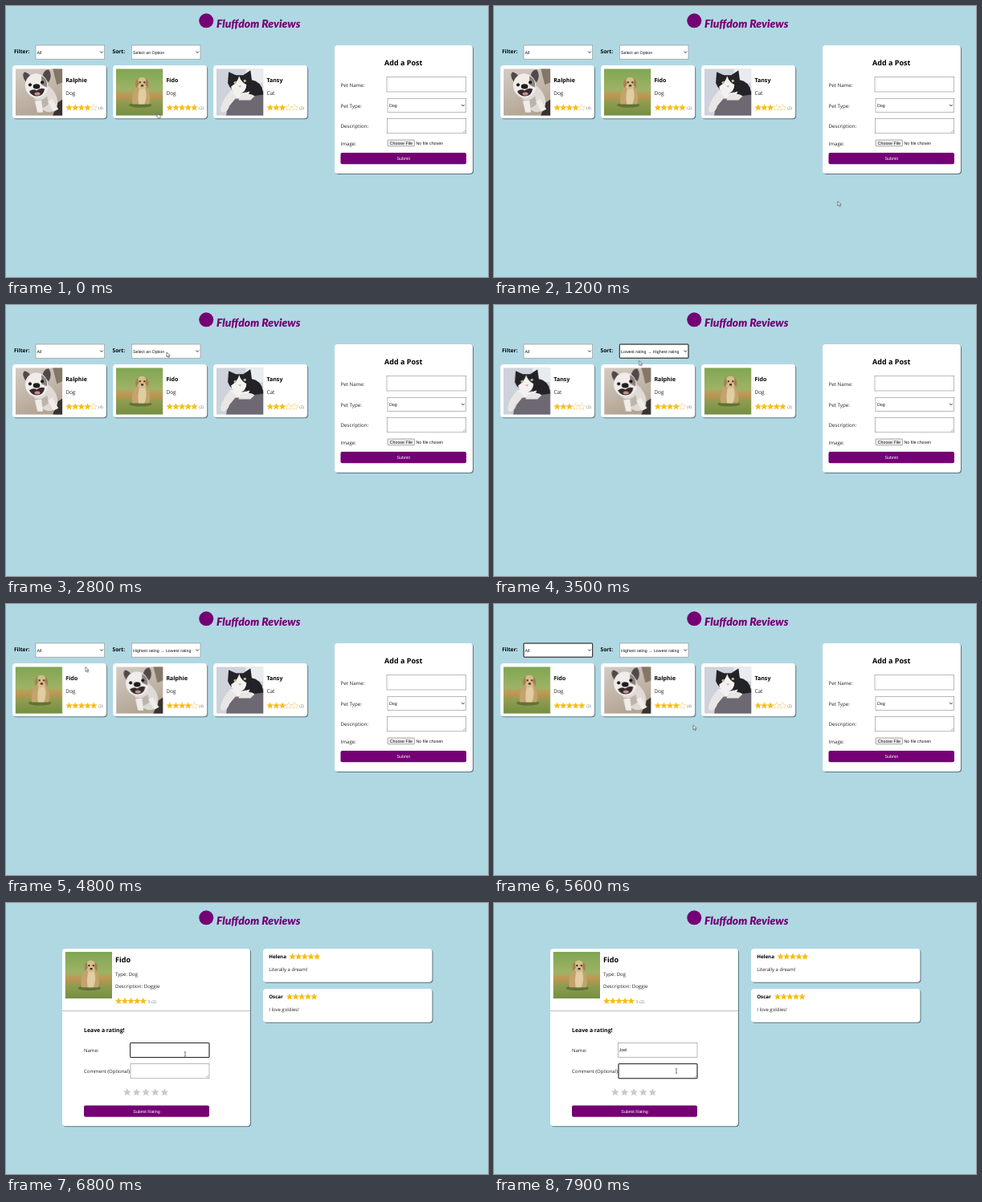
Animation of 600x338 px, one loop 8000 ms. Source, as an HTML page:

```html
<!DOCTYPE html>
<html lang="en">
<head>
<meta charset="utf-8">
<title>Pet ratings</title>
<style>
html, body { margin: 0; width: 100%; height: 100%; overflow: hidden; background: #b0d8e3; }
svg { display: block; }
#stage { width: 600px; height: 338px; text-rendering: geometricPrecision; }
text { font-family: "Open Sans", "Noto Sans", sans-serif; fill: #222; white-space: pre; }
.b { font-weight: 700; fill: #000; }
.ui { font-family: "Liberation Sans", Arial, sans-serif; fill: #111; }
.dim { fill: #777; }
.on { font-family: "Liberation Sans", Arial, sans-serif; fill: #fff; text-anchor: middle; }
.mid { text-anchor: middle; }
.brand { font: italic 900 13.9px Lato, sans-serif; fill: #740074; }
.card { fill: #fff; filter: drop-shadow(1px 1px .7px rgba(30, 50, 60, .6)); }
.field { fill: #fff; stroke: #8a8a8a; stroke-width: .6; }
.focus { fill: none; stroke: #111; stroke-width: .9; }
.line { fill: none; stroke: #222; stroke-width: .9; }
.btn { fill: #740074; }

.ralphie, .fido, .tansy { animation: 8s step-end infinite; }
.ralphie { animation-name: ralphie; }
.fido { animation-name: fido; }
.tansy { animation-name: tansy; }
@keyframes ralphie {
  0% { transform: translateX(0); }
  42.5%, 100% { transform: translateX(125.2px); }
}
@keyframes fido {
  0% { transform: translateX(125.2px); }
  42.5% { transform: translateX(250.2px); }
  53.75%, 100% { transform: translateX(0); }
}
@keyframes tansy {
  0% { transform: translateX(250.2px); opacity: 1; }
  42.5% { transform: translateX(0); opacity: 1; }
  53.75% { transform: translateX(250.2px); opacity: 1; }
  61.875% { transform: translateX(250.2px); opacity: 0; }
  67.5%, 100% { transform: translateX(250.2px); opacity: 1; }
}

.pointer { animation: pointer 8s linear infinite; }
@keyframes pointer {
  0%, 1.25% { transform: translate(188.5px, 133px); }
  6% { transform: translate(205px, 205px); }
  11.25% { transform: translate(300px, 260px); }
  16.25% { transform: translate(470px, 238px); }
  21.25% { transform: translate(562px, 175px); }
  23.75% { transform: translate(560px, 192px); }
  28.75% { transform: translate(354px, 171px); }
  33.75%, 36.25% { transform: translate(200px, 59px); }
  41.25%, 42.5% { transform: translate(182px, 85px); }
  43.75% { transform: translate(180.5px, 69.5px); }
  47.5%, 49% { transform: translate(190px, 58px); }
  53%, 54% { transform: translate(188px, 78px); }
  60% { transform: translate(99px, 78.5px); }
  61.875% { transform: translate(92px, 78px); }
  64.5%, 65.5% { transform: translate(88px, 58px); }
  67.5% { transform: translate(90px, 70px); }
  70% { transform: translate(248px, 151px); }
  72% { transform: translate(240px, 152px); }
  77%, 78.75% { transform: translate(92px, 111px); }
  80%, 82.5% { transform: translate(205px, 184px); }
  84%, 92.5% { transform: translate(223px, 188.5px); }
  95%, 100% { transform: translate(227px, 209.5px); }
}
</style>
</head>
<body>
<svg id="stage" viewBox="0 0 600 338">
  <defs>
    <path id="star" d="M0-4.2 1.25-1.4 4.2-1.2 1.95.75 2.6 3.7 0 2.1-2.6 3.7-1.95.75-4.2-1.2-1.25-1.4Z"/>
    <linearGradient id="floor" x2=".4" y2="1">
      <stop stop-color="#d3ccc5"/><stop offset="1" stop-color="#b3a594"/>
    </linearGradient>
    <linearGradient id="grass" x2="0" y2="1">
      <stop stop-color="#7fa652"/><stop offset=".45" stop-color="#9fb266"/>
      <stop offset=".58" stop-color="#c39350"/><stop offset=".7" stop-color="#929c50"/>
      <stop offset="1" stop-color="#748f42"/>
    </linearGradient>
    <symbol id="ralphie" viewBox="0 0 58 58">
      <path fill="url(#floor)" d="M0 0h58v58H0z"/>
      <path fill="#857768" d="M46 0h12v17l-7 3z"/>
      <path fill="#39322f" d="M52 42l6-4v20H46z"/>
      <ellipse cx="37" cy="36" rx="13" ry="19" fill="#dfdad6" transform="rotate(-32 37 36)"/>
      <path fill="#bdb4ad" d="M22 37q8 5 17-3l2 10q-8 7-16 4z"/>
      <path fill="#f0ece8" d="M24 40l3 14h7l-2-15zM40 41l7 12 6-3-8-13z"/>
      <path fill="#514849" d="M13 17Q7 8 11 4q6 1 9 8zM33 10q2-9 8-9 5 7 0 16z"/>
      <ellipse cx="26" cy="21" rx="14" ry="15" fill="#f0ece9" transform="rotate(-10 26 21)"/>
      <path fill="#8b8280" d="M32 9q8 3 7 14l-7-3z"/>
      <circle cx="18" cy="20" r="2" fill="#191718"/>
      <circle cx="33" cy="17" r="2" fill="#191718"/>
      <ellipse cx="26" cy="22" rx="4.3" ry="3" fill="#201d20"/>
      <path fill="#352a2c" d="M17 28q5-4 9-1 5-4 10-2-1 8-9 9-7 0-10-6z"/>
      <ellipse cx="27" cy="31" rx="3.5" ry="2" fill="#c38d91"/>
    </symbol>
    <symbol id="fido" viewBox="0 0 58 58">
      <path fill="url(#grass)" d="M0 0h58v58H0z"/>
      <ellipse cx="30" cy="45" rx="14" ry="3" fill="#5f7334"/>
      <path fill="#c3a36d" d="M26 21q-8 9-6 23h21q3-9-3-22z"/>
      <path fill="#e0cda2" d="M29 24q-3 10-1 20h7q4-10 1-20z"/>
      <ellipse cx="32" cy="18" rx="6.5" ry="7.5" fill="#d6bd8b"/>
      <path fill="#a58250" d="M27 12q-5 5-2 12l3-4zM37 12q5 5 2 12l-3-4z"/>
      <path fill="#3a2d22" d="M28.5 16h2v2h-2zM34 16h2v2h-2zM30.8 20h3v2.2h-3z"/>
    </symbol>
    <symbol id="tansy" viewBox="0 0 58 58">
      <path fill="#cdd2db" d="M0 0h58v58H0z"/>
      <path fill="#e9ebef" d="M36 0h22v18H36z"/>
      <path fill="#6d6872" d="M15 36q17-10 43-9v31H12z"/>
      <path fill="#232226" d="M36 13q15 0 20 10l2 9-22 3z"/>
      <path fill="#232226" d="M14 18l1-14 9 4h9l9-6 2 15q-1 11-14 13-12-1-16-12z"/>
      <path fill="#f3f2f0" d="M28 9q2 7 9 11 0 9-9 11-9 0-10-9 8-5 10-13zM17 27q11 6 24 1l-3 9H15z"/>
      <path fill="#e9e7e5" d="M17 28Q8 37 5 49q0 6 4 5 5-1 7-8l9-11zM30 33q12-4 17 1l-5 5H27z"/>
      <circle cx="23" cy="17" r="1.6" fill="#b8c391"/>
      <circle cx="35" cy="15" r="1.6" fill="#b8c391"/>
      <path fill="#cf9897" d="M27 21h4l-2 2z"/>
    </symbol>
  </defs>
</svg>
<script>
const LOOP = 8000, OPEN = 6250;
const stage = document.getElementById('stage');
const rules = [];

// Shows a piece of markup only from one time to another
const during = (from, to, body) => {
  const name = 'w' + rules.length, pc = t => t / LOOP * 100 + '%';
  const start = from ? `0%{opacity:0}${pc(from)}{opacity:1}` : '0%{opacity:1}';
  const end = to < LOOP ? `${pc(to)}{opacity:0}` : '100%{opacity:1}';
  rules.push(`@keyframes ${name}{${start}${end}}`);
  return `<g style="animation:${name} 8s step-end infinite">${body}</g>`;
};

const text = (x, y, size, str, cls = '') =>
  `<text x="${x}" y="${y}" font-size="${size}" class="${cls}">${str}</text>`;
const rect = (x, y, w, h, cls, r = 0) =>
  `<rect x="${x}" y="${y}" width="${w}" height="${h}" rx="${r}" class="${cls}"/>`;
const photo = (id, x, y) => `<use href="#${id}" x="${x}" y="${y}" width="58.5" height="58.5"/>`;

const stars = (x, y, full, gap = 7.65, scale = 1, color = '#f8bd16') =>
  [0, 1, 2, 3, 4].map(i => {
    const paint = i < full ? `fill="${color}"` : 'fill="#fff" stroke="#f3cf75" stroke-width=".6"';
    return `<use href="#star" transform="translate(${x + i * gap} ${y}) scale(${scale})" ${paint}/>`;
  }).join('');

const chevron = (x, y) => `<path class="line" d="M${x - 1.8} ${y - 1}l1.8 1.9 1.8-1.9"/>`;
const select = (x, y, w) => rect(x, y, w, 17.2, 'field') + chevron(x + w - 3.8, y + 8.6);
const area = (x, y, w) => rect(x, y, w, 18.2, 'field') +
  `<path stroke="#777" stroke-width=".5" d="M${x + w - 4} ${y + 17}l3-3m-1.4 3l1.4-1.4"/>`;
const button = (x, y, w, label) =>
  rect(x, y, w, 14.2, 'btn', 2) + text(x + w / 2, y + 9, 5.3, label, 'on');

const pet = (id, name, type, full, votes) => `<g class="${id}">` +
  rect(8, 74, 117, 66.3, 'card', 4) + photo(id, 11.8, 78.2) +
  text(74.2, 94.6, 7.1, name, 'b') + text(74.2, 110.6, 6.5, type) +
  stars(78.6, 126.7, full) + text(115, 129, 5, `(${votes})`, 'dim') + '</g>';

const review = (y, name, starX, words) => rect(320, y, 210.5, 41.8, 'card', 4) +
  text(327.2, y + 12.2, 6.2, name, 'b') + stars(starX, y + 9.8, 5) +
  text(327.2, y + 28.2, 6, words);

const header = '<circle cx="249.3" cy="18.3" r="9" fill="#740074"/>' +
  '<text x="262" y="27" class="brand">Fluffdom Reviews</text>';

const toolbar =
  text(10, 59.3, 6.6, 'Filter:', 'b') + select(37, 49, 85.7) +
  during(0, 4950, text(38.6, 59.5, 5.3, 'All', 'ui')) +
  during(4950, 5400, text(38.6, 59.5, 5.3, 'Dog', 'ui')) +
  during(5400, LOOP, text(38.6, 59.5, 5.3, 'All', 'ui')) +
  during(4900, LOOP, rect(37, 49, 85.7, 17.2, 'focus', 1)) +
  text(132.5, 59.3, 6.7, 'Sort:', 'b') + select(156.3, 49, 85.7) +
  during(0, 3400, text(158, 59.5, 5.3, 'Select an Option', 'ui')) +
  during(3400, 4300, text(158, 59.5, 5.3, 'Lowest rating → Highest rating', 'ui')) +
  during(4300, LOOP, text(158, 59.5, 5.3, 'Highest rating → Lowest rating', 'ui')) +
  during(2900, 4600, rect(156.3, 49, 85.7, 17.2, 'focus', 1));

const postForm = rect(409, 49, 172, 160, 'card', 4) +
  text(494.7, 74.2, 9, 'Add a Post', 'b mid') +
  text(416.5, 100.6, 6.2, 'Pet Name:') + rect(474, 88.7, 98.7, 18.3, 'field') +
  text(416.5, 126.6, 6.2, 'Pet Type:') + select(475, 115.3, 97.7) +
  text(477, 126, 5.3, 'Dog', 'ui') +
  text(416.5, 152.4, 6.2, 'Description:') + area(474.5, 140.6, 98.2) +
  text(416.5, 173.6, 6.2, 'Image:') +
  '<rect x="475" y="167" width="33.6" height="7.8" rx=".8" fill="#efefef" stroke="#777" stroke-width=".6"/>' +
  text(477.7, 172.8, 5.3, 'Choose File', 'ui') + text(510.5, 172.8, 5.3, 'No file chosen', 'ui') +
  button(416.5, 183, 156.5, 'Submit');

const list = toolbar + pet('ralphie', 'Ralphie', 'Dog', 4, 4) +
  pet('fido', 'Fido', 'Dog', 5, 2) + pet('tansy', 'Tansy', 'Cat', 3, 2) + postForm;

const typed = [7000, 7120, 7240, 7360, LOOP];
const typing = [1, 2, 3, 4].map((n, i) =>
  during(typed[i], typed[i + 1], text(155.6, 185.4, 5.3, 'Joel'.slice(0, n), 'ui'))).join('');

const detail = rect(70, 57, 234, 221.3, 'card', 4) + photo('fido', 73.5, 60.8) +
  text(136, 74.2, 9.1, 'Fido', 'b') + text(136, 91.4, 6.1, 'Type: Dog') +
  text(136, 106.2, 6.1, 'Description: Doggie') +
  stars(140.2, 122.2, 5) + text(177, 124.8, 5, '5 (2)', 'dim') +
  '<path stroke="#aaa" stroke-width=".8" d="M70 134.6h234"/>' +
  text(97, 160.6, 6.9, 'Leave a rating!', 'b') +
  text(97, 186, 6, 'Name:') + rect(154.6, 174.5, 98.4, 18, 'field') + typing +
  during(6400, 7600, rect(154.6, 174.5, 98.4, 18, 'focus', 1)) +
  text(97, 212.4, 6, 'Comment (Optional):') + area(155, 200.6, 98) +
  during(7600, LOOP, rect(155, 200.6, 98, 18.2, 'focus', 1)) +
  stars(150.8, 236, 5, 11.65, 1.15, '#c9c9c9') +
  button(97, 252.5, 156, 'Submit Rating') +
  review(57, 'Helena', 356.6, 'Literally a dream!') +
  review(107, 'Oscar', 353, 'I love goldies!');

const arrow = '<path d="M0 0v5.8l1.4-1.2 1 2.1 1-.5-1-2h1.8z" fill="#fff" stroke="#333" stroke-width=".6"/>';
const hand = '<path d="M0 0q.9-.5 1.1.4v2.1l2.6.7q.6 1.8-.4 3.6H.6L-1.2 4l.9-.5L0 4z" fill="#fff" stroke="#333" stroke-width=".6"/>';
const beam = '<path d="M-1.2-2.7h2.4M0-2.7v5.4m-1.2 0h2.4" fill="none" stroke="#444" stroke-width=".7"/>';
const pointer = '<g class="pointer">' + during(0, 250, hand) + during(250, 6050, arrow) +
  during(6050, 6320, hand) + during(6320, LOOP, beam) + '</g>';

stage.insertAdjacentHTML('beforeend',
  header + during(0, OPEN, list) + during(OPEN, LOOP, detail) + pointer);
document.querySelector('style').append(rules.join('\n'));
</script>
</body>
</html>
```
